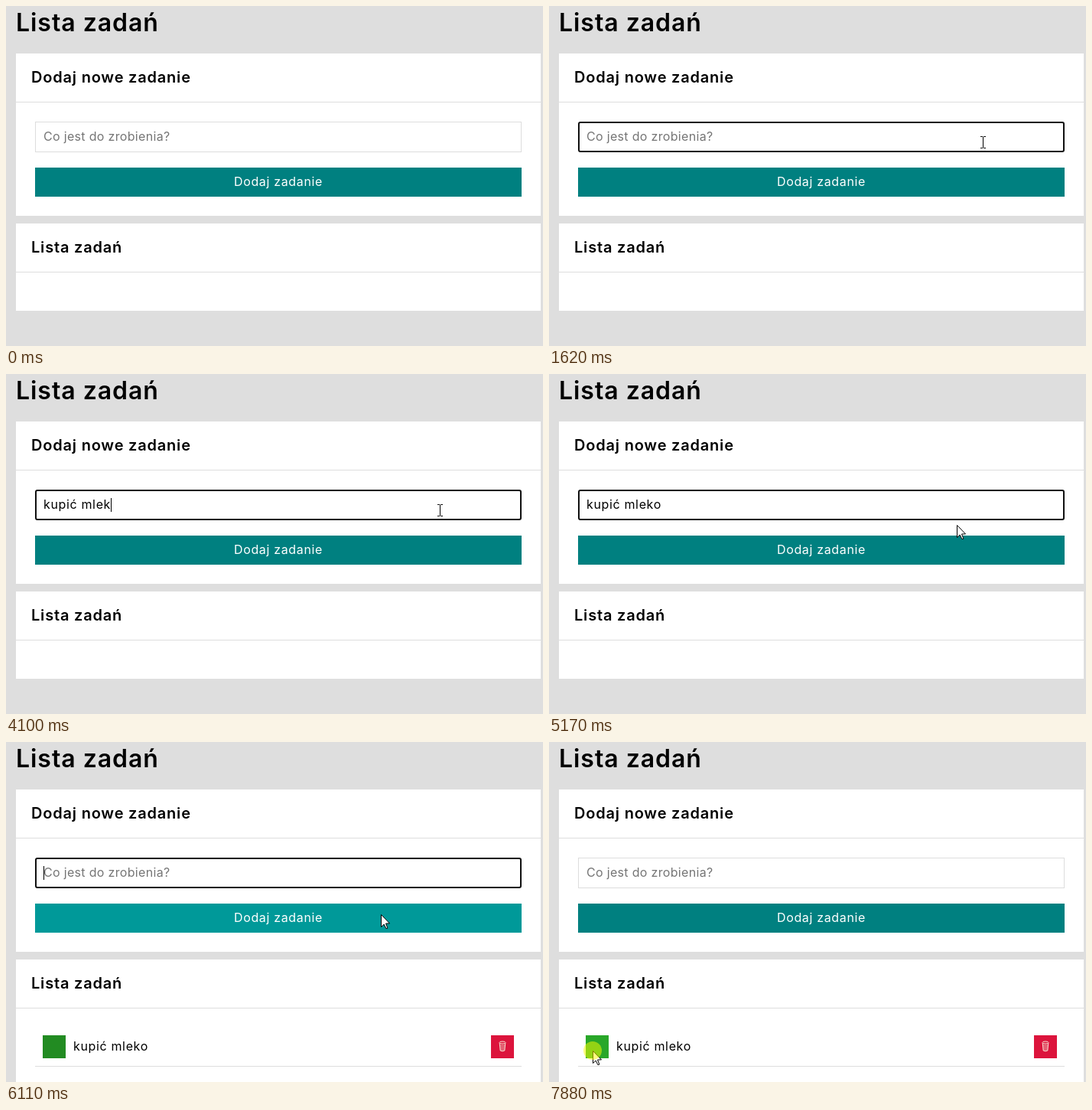
Write an HTML page with a canvas that moves like this. It is 702 px wide and 444 px high and loops after 8 s.

```html
<!DOCTYPE html>
<html lang="pl">
<head>
<meta charset="utf-8">
<title>Lista zadań</title>
<style>
  html, body { margin: 0; width: 100%; height: 100%; overflow: hidden; background: #dedede; }
  #stage { position: absolute; left: 0; top: 0; width: 702px; height: 444px; overflow: hidden; background: #dedede;
    font: 400 16px/20px Inter, "Open Sans", sans-serif; letter-spacing: .65px; color: #000; white-space: pre; }
  #stage * { position: absolute; box-sizing: border-box; margin: 0; }
  #stage [hidden] { display: none; }
  h1 { left: 13px; top: 2px; font: 600 32px/40px Inter, sans-serif; letter-spacing: .95px; }
  h2 { left: 20px; top: 18px; font: 600 20px/26px Inter, sans-serif; letter-spacing: .8px; }
  .panel { left: 13px; width: 686px; background: #fff; }
  .line { height: 1px; background: #ddd; }
  .panel > .line { left: 0; right: 0; top: 63px; }
  #add { top: 62px; height: 212px; }
  #list { top: 284px; height: 114px; }
  #field { left: 38px; top: 151px; width: 636px; height: 40px; border: 1px solid #ddd; background: #fff; }
  #field.focus { border: 2px solid #101010; border-radius: 3px; }
  #hint { left: 49px; top: 160px; color: #757575; letter-spacing: .32px; }
  #typed { left: 49px; top: 160px; height: 20px; }
  #stage #text { position: static; }
  #caret { left: 100%; top: 2px; width: 1px; height: 18px; background: #000; }
  #button { left: 38px; top: 211px; width: 636px; height: 38px; line-height: 37px; background: #008080; color: #fff; text-align: center; }
  #button.hover { background: #009999; }
  #item { left: 0; top: 0; width: 702px; height: 444px; }
  #done, #remove { top: 383px; width: 30px; height: 30px; }
  #done { left: 48px; background: #228b22; }
  #done.hover { background: #29a729; }
  #remove { left: 634px; background: #dc143c; }
  #task { left: 88px; top: 387px; }
  #item > .line { left: 38px; width: 636px; top: 423px; }
  canvas { left: 0; top: 0; }
</style>
</head>
<body>
<div id="stage">
  <h1>Lista zadań</h1>
  <div class="panel" id="add"><h2>Dodaj nowe zadanie</h2><div class="line"></div></div>
  <div class="panel" id="list"><h2>Lista zadań</h2><div class="line"></div></div>
  <div id="field"></div>
  <div id="hint">Co jest do zrobienia?</div>
  <div id="typed"><span id="text"></span><i id="caret"></i></div>
  <div id="button">Dodaj zadanie</div>
  <div id="item"><div id="done"></div><div id="task">kupić mleko</div><div id="remove"></div><div class="line"></div></div>
  <canvas id="overlay" width="702" height="444"></canvas>
</div>
<script>
const LOOP = 8000, BLINK = 510, STEP = 66, FLASH = 75;
const TASK = "kupić mleko";
const FOCUS = 1030, PRESS = 6030, SUBMIT = 6110, CHECK = 7880;

// Typing comes in two bursts of evenly spaced keys
const BURSTS = [
  { start: 1640, gap: 250, keys: 4 },
  { start: 3160, gap: 188, keys: 7 }
];

// Each move is an eased quadratic curve: from, control point, to
const MOVES = [
  { start: 150, steps: 10, path: [[628, 414], [549, 213], [567, 178]] },
  { start: 5034, steps: 5, path: [[567, 178], [512, 201], [496, 246]] },
  { start: 5364, steps: 4, path: [[496, 246], [491, 240], [490, 225]] },
  { start: 6650, steps: 16, path: [[490, 225], [208, 443], [57, 403]] }
];

const $ = id => document.getElementById(id);
const ctx = $("overlay").getContext("2d");
const inside = (p, x, y, w, h) => p.x >= x && p.x < x + w && p.y >= y && p.y < y + h;
const smooth = f => f * f * (3 - 2 * f);

function pointer(t) {
  const move = MOVES.filter(m => t >= m.start).pop();
  if (!move) return null;
  const s = smooth(Math.min(1, Math.floor((t - move.start) / STEP) / move.steps));
  const [a, b, c] = move.path;
  const at = i => Math.round((1 - s) ** 2 * a[i] + 2 * s * (1 - s) * b[i] + s * s * c[i]);
  return { x: at(0), y: at(1) };
}

function typing(t) {
  let count = 0, last = FOCUS;
  for (const { start, gap, keys } of BURSTS) {
    if (t < start) break;
    const n = Math.min(keys, Math.floor((t - start) / gap) + 1);
    count += n;
    last = start + (n - 1) * gap;
  }
  return { count, last };
}

function drawBin() {
  ctx.strokeStyle = ctx.fillStyle = "#f6e3d2";
  ctx.lineWidth = 1;
  ctx.beginPath();
  ctx.ellipse(649, 392.5, 4, 1.5, 0, 0, Math.PI * 2);
  ctx.moveTo(645.2, 393);
  ctx.lineTo(646.2, 403);
  ctx.quadraticCurveTo(649, 404.6, 651.8, 403);
  ctx.lineTo(652.8, 393);
  ctx.stroke();
  ctx.globalAlpha = .75;
  for (let x = 646.5; x < 651; x += 2) ctx.fillRect(x, 395, 1, 8);
  ctx.globalAlpha = 1;
}

function drawArrow({ x, y }) {
  const outline = [[0, 0], [0, 16], [3.7, 12.6], [6.3, 18], [8.4, 17.6], [6, 11.5], [11, 11.4]];
  ctx.save();
  ctx.translate(x + .5, y + .5);
  ctx.beginPath();
  outline.forEach(point => ctx.lineTo(...point));
  ctx.closePath();
  ctx.fillStyle = "#fff";
  ctx.fill();
  ctx.strokeStyle = "#000";
  ctx.lineWidth = 1;
  ctx.stroke();
  ctx.restore();
}

function drawBeam({ x, y }) {
  ctx.fillStyle = "#000";
  ctx.fillRect(x, y - 7, 1, 14);
  for (const end of [y - 8, y + 7]) {
    ctx.fillRect(x - 3, end, 3, 1);
    ctx.fillRect(x + 1, end, 3, 1);
  }
}

function drawClick({ x, y }) {
  ctx.fillStyle = "rgba(255,255,0,.5)";
  ctx.beginPath();
  ctx.arc(x, y, 12, 0, Math.PI * 2);
  ctx.fill();
}

function render(t) {
  const p = pointer(t);
  const added = t >= SUBMIT;
  const focused = t >= FOCUS && t < PRESS || added && t < CHECK;
  const { count, last } = typing(t);
  const text = added ? "" : TASK.slice(0, count);
  const caretOn = focused && Math.floor((t - (added ? SUBMIT : last)) / BLINK) % 2 === 0;

  $("field").className = focused ? "focus" : "";
  $("hint").hidden = text !== "";
  $("text").textContent = text;
  $("caret").hidden = !caretOn;
  $("button").className = p && inside(p, 38, 211, 636, 38) ? "hover" : "";
  $("list").style.height = added ? "180px" : "";
  $("item").hidden = !added;
  $("done").className = p && inside(p, 48, 383, 30, 30) ? "hover" : "";

  ctx.clearRect(0, 0, 702, 444);
  if (added) drawBin();
  if (!p) return;
  (inside(p, 38, 151, 636, 40) ? drawBeam : drawArrow)(p);
  const clicked = [FOCUS, PRESS, CHECK].filter(c => t >= c).pop();
  if (t - clicked < FLASH || clicked === CHECK) drawClick(p);
}

function tick() {
  render(performance.now() % LOOP);
  requestAnimationFrame(tick);
}
tick();
</script>
</body>
</html>
```
